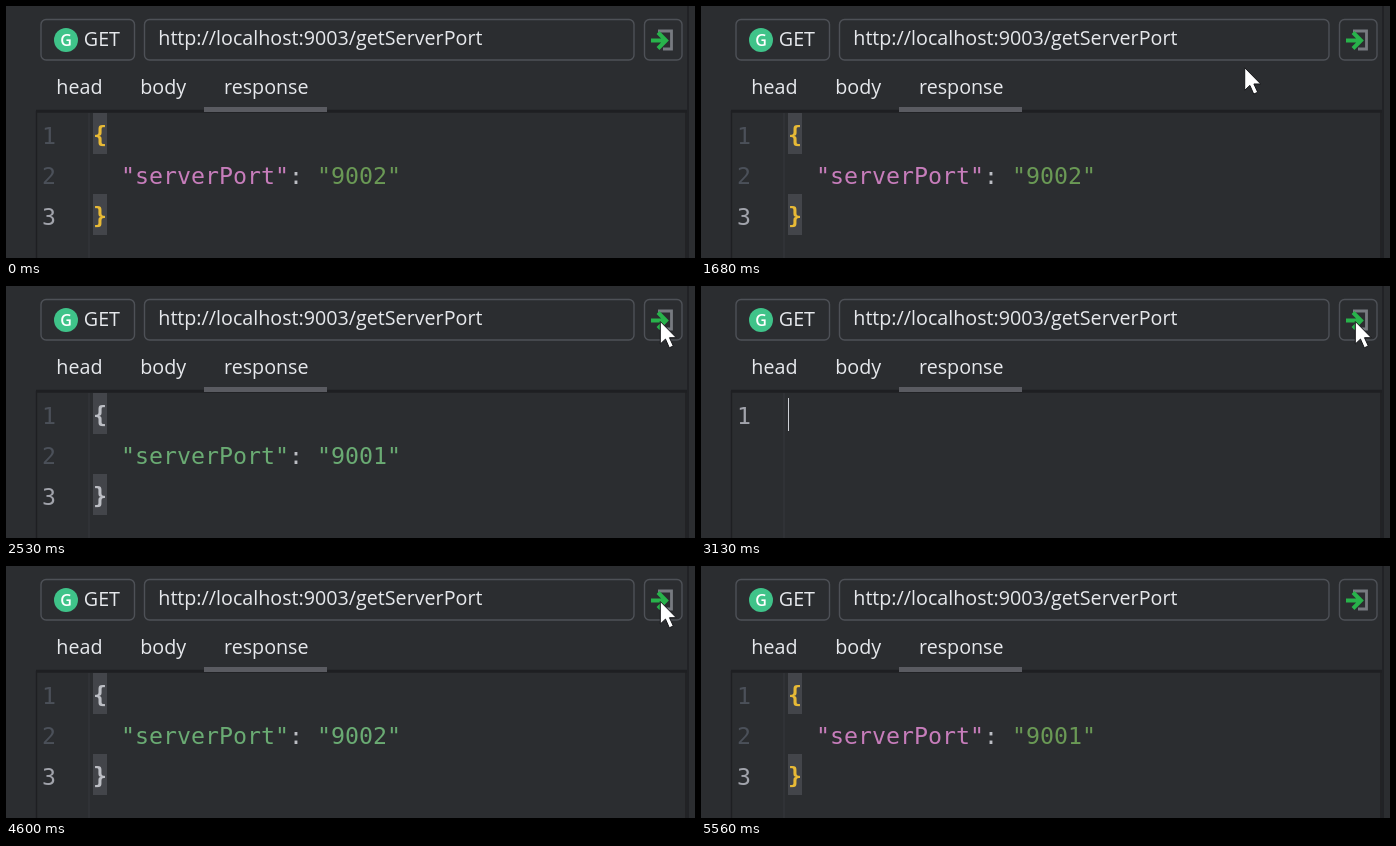
An HTML page that plays this animation: 689 px wide and 252 px high, repeating every 6530 ms.

```html
<!DOCTYPE html>
<html lang="en">
<head>
<meta charset="utf-8">
<title>Port response</title>
<style>
  html, body { margin: 0; width: 100%; height: 100%; overflow: hidden; background: #2b2d30; }
  svg { display: block; width: 689px; height: 252px; }
  text { white-space: pre; }
  .ui text { font: 19.7px "Open Sans", "Noto Sans", sans-serif; fill: #e6e8ec; }
  .ui .method { font-size: 16px; font-weight: 600; fill: #fff; }
  .code text { font: 23.26px "DejaVu Sans Mono", "Noto Sans Mono", monospace; fill: #bcbec4; }
  .box { fill: none; stroke: #4e5157; stroke-width: 1.4; }
  .pressed { fill: #43454a; }
  .edge { fill: none; stroke: #1e1f22; stroke-width: 1.4; }
  .code .num { fill: #4b5059; }
  .code .now { fill: #a1a3ab; }
  .code .brace { font-weight: bold; }
  .code .key, .code .val { fill: #6aab73; }
  .lit .brace { fill: #e8ba36; }
  .lit .key { fill: #c77dbb; }
  .lit .val { fill: #6a9955; }
</style>
</head>
<body>
<svg viewBox="0 0 689 252">
  <rect width="689" height="252" fill="#2b2d30"/>
  <path class="edge" d="M682 0V252M30.5 105V252M680 105V252"/>
  <path class="edge" d="M30 105.3H681" style="stroke-width:3"/>
  <path d="M83 107V252" stroke="#36383d"/>

  <g class="ui">
    <rect class="box" x="35" y="13.5" width="93.5" height="40.5" rx="5"/>
    <rect class="box" x="138.5" y="13.5" width="489.5" height="40.5" rx="5"/>
    <rect class="box" id="send" x="638.5" y="13.5" width="37.5" height="40.5" rx="5"/>
    <circle cx="60" cy="34" r="12" fill="#3fc389"/>
    <text class="method" x="60" y="39.7" text-anchor="middle">G</text>
    <text x="77.8" y="40">GET</text>
    <text x="152.3" y="39">http://localhost:9003/getServerPort</text>
    <text x="50.3" y="88">head</text>
    <text x="134.3" y="88">body</text>
    <text x="218" y="88">response</text>
    <rect x="198" y="101" width="123" height="5" fill="#5a5b61"/>
  </g>
  <path d="M652 25H665.5V43H657" fill="none" stroke="#777a80" stroke-width="2.8"/>
  <path d="M645 34.5H659M652 26.5L660 34.5L652 42.5" fill="none" stroke="#28b34b" stroke-width="4"/>

  <g class="code">
    <g id="full">
      <rect x="87" y="107" width="14" height="41" fill="#43454a"/>
      <rect x="87" y="188" width="14" height="41" fill="#43454a"/>
      <text class="num" x="36" y="138">1</text>
      <text class="num" x="36" y="178">2</text>
      <text class="num now" x="36" y="219">3</text>
      <text class="brace" x="87" y="137">{</text>
      <text x="115" y="178"><tspan class="key">"serverPort"</tspan>: <tspan class="val" id="port"></tspan></text>
      <text class="brace" x="87" y="218">}</text>
    </g>
    <g id="empty">
      <text class="num now" x="36" y="138">1</text>
      <path d="M87.5 112V145" stroke="#ced0d6"/>
    </g>
  </g>

  <path id="arrow" d="M0 0V22.5L5.2 17.6L9 26.3L13 24.5L9.2 16.2H16Z" fill="#fff" stroke="#16171a"/>
  <path id="beam" d="M-6.5 -12H-2L0 -10.5L2 -12H6.5M0 -10.5V10.5M-6.5 12H-2L0 10.5L2 12H6.5" fill="none" stroke="#f0f0f0" stroke-width="1.6"/>
</svg>
<script>
const LOOP = 6530;
const STEP = 560 / 12;  // pointer refresh
const LIT_AFTER = 280;  // delay of syntax colours
const EDITOR_TOP = 106;
const $ = id => document.getElementById(id);

const clicks = [
  { press: 2340, clear: 2480, reply: 2530 },
  { press: 2950, clear: 3130, reply: 3180 },
  { press: 3700, clear: 3850, reply: 3900 },
  { press: 4410, clear: 4600, reply: 4600 },
  { press: 5110, clear: 5200, reply: 5250 }
];

// straight pointer moves between these rests
const stops = [
  { t: 1270, x: 180, y: 204 },
  { t: 1830, x: 671, y: 12 },
  { t: 1960, x: 671, y: 12 },
  { t: 2110, x: 654.3, y: 35.5 },
  { t: 5250, x: 654.3, y: 35.5 },
  { t: 5530, x: 160, y: 244 }
];
const enter = stops[0].t, leave = stops[stops.length - 1].t;

const ease = k => k * k * (3 - 2 * k);
const show = (el, on) => { el.style.display = on ? "" : "none"; };

function pointer(t) {
  const i = stops.findIndex(s => s.t > t);
  const a = stops[i - 1], b = stops[i];
  const since = Math.floor((t - a.t) / STEP) * STEP;
  const k = ease(since / (b.t - a.t));
  return { x: a.x + (b.x - a.x) * k, y: a.y + (b.y - a.y) * k };
}

function drawEditor(t) {
  const replies = clicks.filter(c => c.reply <= t);
  const last = replies[replies.length - 1];
  const waiting = clicks.some(c => t >= c.clear && t < c.reply);
  show($("full"), !waiting);
  show($("empty"), waiting);
  $("full").classList.toggle("lit", !last || t >= last.reply + LIT_AFTER);
  // two servers answer in turn
  $("port").textContent = `"${replies.length % 2 ? 9001 : 9002}"`;
  $("send").classList.toggle("pressed", clicks.some(c => t >= c.press && t < c.clear));
}

function drawPointer(t) {
  const on = t >= enter && t < leave;
  const { x, y } = on ? pointer(t) : { x: 0, y: 0 };
  const inCode = y > EDITOR_TOP;
  show($("arrow"), on && !inCode);
  show($("beam"), on && inCode);
  $(inCode ? "beam" : "arrow").setAttribute("transform", `translate(${x} ${y})`);
}

const start = performance.now();
function tick() {
  const t = Math.max(0, performance.now() - start) % LOOP;
  drawEditor(t);
  drawPointer(t);
  requestAnimationFrame(tick);
}
tick();
</script>
</body>
</html>
```
